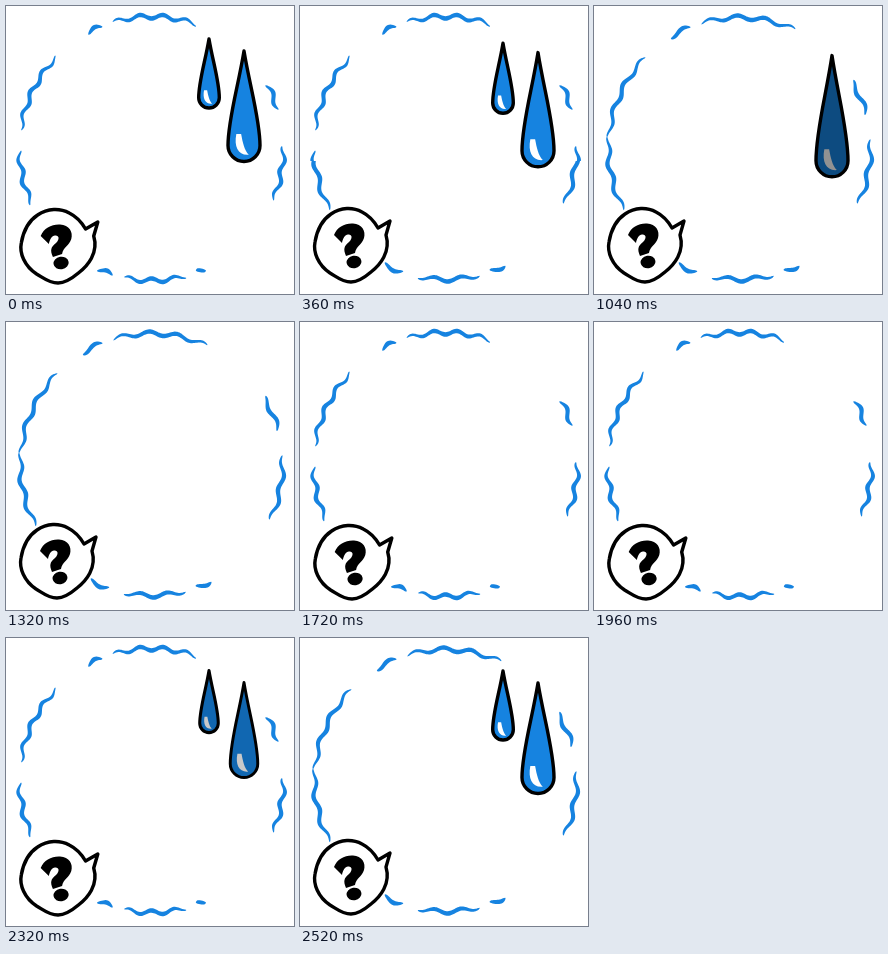
An HTML page with a canvas for the animation above (2.64 s loop, 288x288 px).

```html
<!DOCTYPE html>
<html lang="en">
<head>
<meta charset="utf-8">
<style>
  html, body { margin: 0; width: 100%; height: 100%; overflow: hidden; background: #fff; }
  canvas { display: block; width: 288px; height: 288px; }
</style>
</head>
<body>
<canvas id="stage" width="288" height="288"></canvas>
<script>
const ctx = document.getElementById('stage').getContext('2d');
const LOOP = 2640, STEP = 40, FLIP = 43.9, HOLD = 120;
const BLUE = [22, 131, 224], WHITE = [255, 255, 255];

const bubble = new Path2D('M78 222 L90 215 L86 229 C91 246 80 259 71 266 C64 272 58 276 51 276 C42 276 37 271 30 267 C18 259 13 246 15 236 C17 224 22 214 31 208 C41 201 53 201 62 206 C68 209 74 215 78 222 Z');
const mark = new Path2D('M34 229 C37 221 45 217 53 217.5 C62 218 66 225 64 232 C62 239 56 240 55 247 L46 250 C43 243 44 240 49 236 C53 232 52 228 48 228.5 C45 229 43 232 42 237 Z');
mark.ellipse(54, 256, 7.5, 6.3, -.15, 0, 7);

// Two poses of the trembling ring: wavy arcs, from and to in degrees.
const poses = [
  { radius: 132, wave: 10, grow: 1.02, drop: 1, arcs: [
    [-107, -70], [-119, -112], [-172, -136], [155, 179], [-29, -17],
    [-1, 23], [75, 102], [107, 114], [66, 70]] },
  { radius: 131, wave: 12, grow: 1, drop: 0, arcs: [
    [-107, -65], [-122, -112], [-175, -136], [152, 185], [-31, -15],
    [-4, 25], [75, 102], [109, 118], [63, 70]] }
];
for (const pose of poses) pose.ring = pose.arcs.map(arc => brushArc(pose, arc));

// "slide" and "fadeAt" rule the fall, "shrink" the size at the start of growth.
const drops = [
  { x: 203, top: 33, height: 69, width: 10.3, slide: 8, fadeAt: 490, shrink: .2 },
  { x: 238, top: 45, height: 110.5, width: 16, slide: 3, fadeAt: 710, shrink: .28 }
];

const clamp = (v, min, max) => Math.min(max, Math.max(min, v));
const shade = (color, k) => `rgb(${color.map(c => Math.round(c * k))})`;

// Wavy arc that is thick in the middle and pointed at both ends.
function brushArc({ radius, wave }, [from, to]) {
  const outer = [], inner = [];
  for (let a = from; a <= to; a += .5) {
    const rad = a * Math.PI / 180;
    const r = radius + 2 * Math.cos((a - 5) / wave * 2 * Math.PI);
    const w = .3 + 2 * Math.sqrt(Math.sin(Math.PI * (a - from) / (to - from + .01)));
    const at = d => [145.5 + (r + d) * Math.cos(rad), 142.5 + (r + d) * Math.sin(rad)];
    outer.push(at(w));
    inner.unshift(at(-w));
  }
  const path = new Path2D();
  [...outer, ...inner].forEach(p => path.lineTo(...p));
  path.closePath();
  return path;
}

function drawPose({ ring, grow, drop }, y0, y1) {
  ctx.save();
  ctx.beginPath();
  ctx.rect(0, y0, 288, y1 - y0);
  ctx.clip();
  ctx.fillStyle = shade(BLUE, 1);
  ring.forEach(path => ctx.fill(path));
  ctx.translate(0, drop);
  ctx.scale(grow, 1);
  ctx.fillStyle = '#fff';
  ctx.fill(bubble);
  ctx.lineWidth = 3.4;
  ctx.stroke(bubble);
  ctx.fillStyle = '#000';
  ctx.fill(mark);
  ctx.restore();
}

function drawDrop({ x, top, height, width: w, slide, fadeAt, shrink }, t) {
  const falling = t < LOOP / 2;
  const fall = falling ? t / 680 : 0;
  const unborn = falling ? 0 : Math.max(0, (2480 - t) / 320);
  const light = falling ? Math.min(1, 1 - (t - fadeAt) * .0013) : 1 - .42 * unborn;
  if (light < .5) return;

  const size = 1 - shrink * unborn;
  const h = height + (10 - slide) * fall, cy = h - w;
  ctx.save();
  ctx.translate(x, top + slide * fall - unborn);
  ctx.scale(size, size);
  ctx.beginPath();
  ctx.moveTo(0, 0);
  ctx.bezierCurveTo(w * .36, h * .32, w, h * .62, w, cy);
  ctx.arc(0, cy, w, 0, Math.PI);
  ctx.bezierCurveTo(-w, h * .62, -w * .36, h * .32, 0, 0);
  ctx.closePath();
  ctx.fillStyle = shade(BLUE, light);
  ctx.fill();
  ctx.lineWidth = 3.4;
  ctx.stroke();

  ctx.translate(0, cy);
  ctx.scale(w, w);
  ctx.beginPath();
  ctx.moveTo(-.48, -.72);
  ctx.bezierCurveTo(-.64, .08, -.35, .64, .3, .58);
  ctx.bezierCurveTo(.02, .3, -.08, -.2, -.18, -.72);
  ctx.closePath();
  ctx.fillStyle = shade(WHITE, light);
  ctx.fill();
  ctx.restore();
}

function draw(now) {
  let t = Math.floor(now % LOOP / STEP) * STEP;
  t = t < HOLD ? 0 : Math.min(t, LOOP - HOLD);
  // Each new pose covers the stage from the top down, very quickly.
  const phase = Math.max(0, t / FLIP - .185), n = Math.floor(phase);
  const edge = t ? clamp(Math.round((phase - n) * 10000), 0, 288) : 288;
  ctx.fillStyle = '#fff';
  ctx.fillRect(0, 0, 288, 288);
  ctx.strokeStyle = '#000';
  ctx.lineJoin = 'round';
  drawPose(poses[n % 2], 0, edge);
  drawPose(poses[(n + 1) % 2], edge, 288);
  drops.forEach(drop => drawDrop(drop, t));
}

const start = performance.now();
(function tick() {
  draw(performance.now() - start);
  requestAnimationFrame(tick);
})();
</script>
</body>
</html>
```
